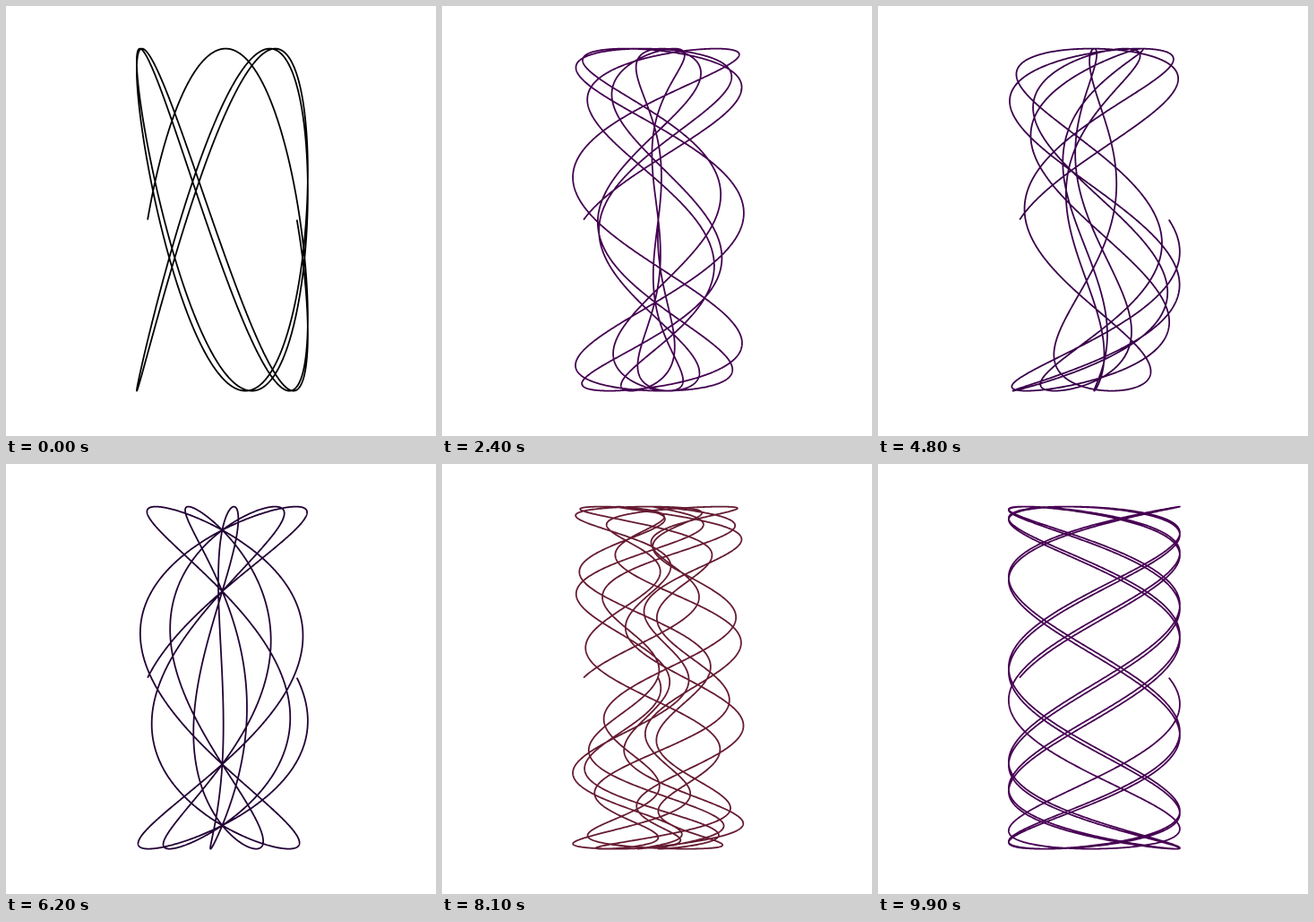
An HTML page with a canvas for the animation above (10 s loop, 480 by 480 pixels).

```html
<!DOCTYPE html>
<html>
<head>
<meta charset="utf-8">
<style>
  html, body { margin: 0; width: 100%; height: 100%; overflow: hidden; background: #fff; }
  canvas { display: block; }
</style>
</head>
<body>
<canvas id="stage" width="480" height="480"></canvas>
<script>
const ctx = document.getElementById('stage').getContext('2d');
const LOOP = 10000, STEP = 100, POINTS = 5000, PHASE = 0.511;

// Steps at which the motion rests for two further steps
const rests = [25, 31, 57];

// Key points: moving step and the two frequencies, in half turns
const keys = [
  [0, 7, 7], [14, 27, 22], [32, 36, 31], [56, 21, 19], [68, 42, 37], [82, 80, 7], [93, 33, 33]
];

const clamp = (v, lo, hi) => Math.min(hi, Math.max(lo, v));

function frequencies(step) {
  const moved = rests.reduce((n, rest) => n - clamp(step - rest, 0, 2), step);
  const i = keys.findIndex(key => key[0] >= moved) || 1;
  const a = keys[i - 1], b = keys[i];
  const f = (moved - a[0]) / (b[0] - a[0]);
  return [1, 2].map(j => Math.round(a[j] + (b[j] - a[j]) * f));
}

// Black to purple at low frequencies, then on to brown
function colour(p) {
  const purple = clamp((p - 7) / 35, 0, 1), brown = clamp((p - 42) / 38, 0, 1);
  const red = 102 * purple ** 1.2;
  const blue = 90 * Math.sin(purple * Math.PI / 2) - 80 * brown;
  return `rgb(${red}, ${56 * brown}, ${blue})`;
}

function draw(step) {
  const [p, q] = frequencies(step);
  ctx.clearRect(0, 0, 480, 480);
  ctx.strokeStyle = colour(p);
  ctx.lineWidth = 1.8;
  ctx.lineJoin = 'round';
  ctx.beginPath();
  for (let i = 0; i <= POINTS; i++) {
    const t = 2 * Math.PI * i / POINTS;
    const x = (Math.cos(p / 2 * t + PHASE) + Math.cos(q / 2 * t + PHASE)) / 2;
    ctx.lineTo(241.4 - 95.5 * x, 238.6 - 191 * Math.sin(5 * t));
  }
  ctx.stroke();
}

const start = performance.now();
let shown = -1;
function tick() {
  const step = Math.floor((performance.now() - start) % LOOP / STEP);
  if (step !== shown) draw(shown = step);
  requestAnimationFrame(tick);
}
tick();
</script>
</body>
</html>
```
